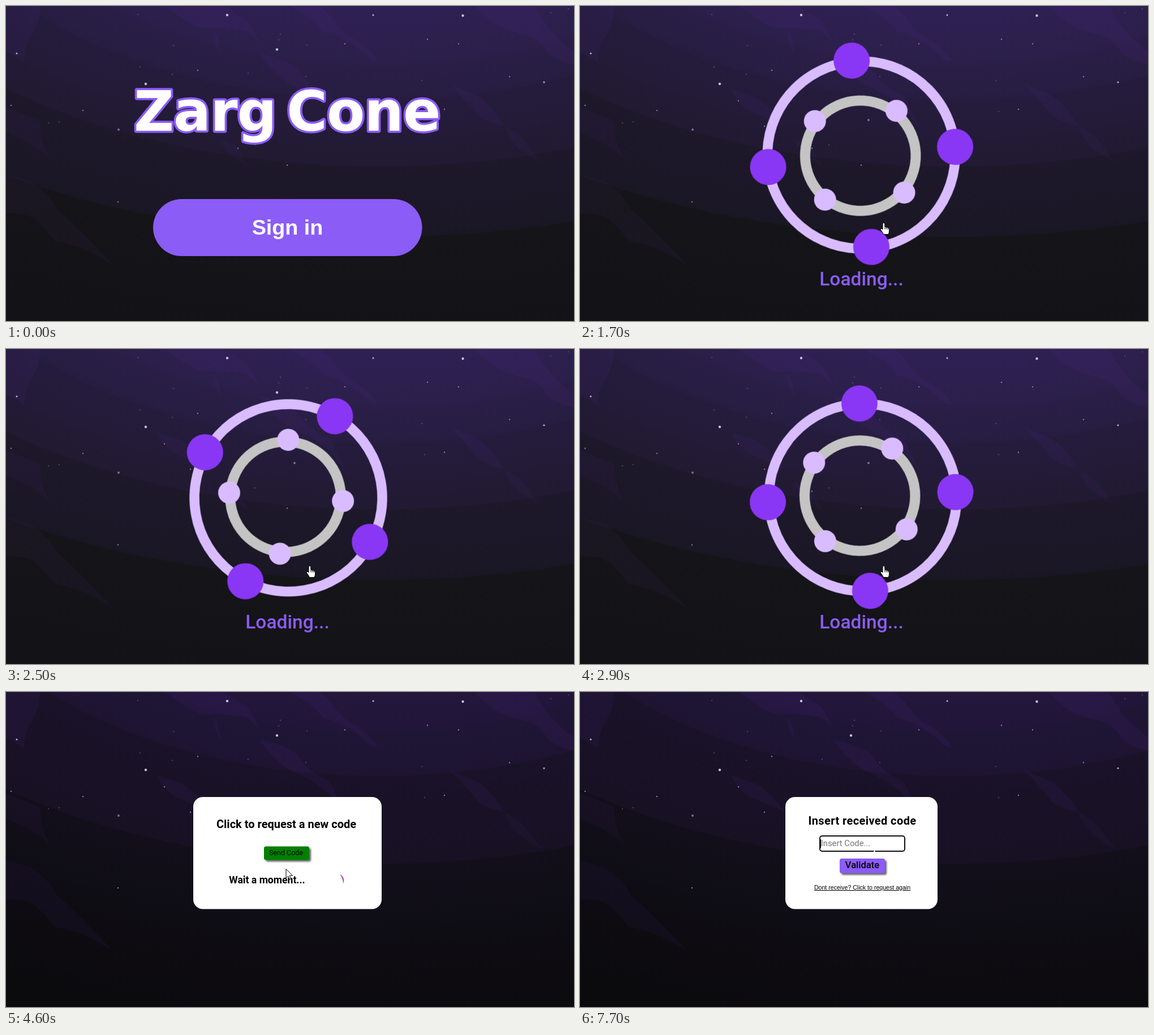
These frames come from a looping animation (1004 px wide and 558 px high, 8 s). An HTML page without scripts:

```html
<!DOCTYPE html>
<html lang="en">
<head>
<meta charset="utf-8">
<title>Sign-in flow</title>
<style>
html, body { margin: 0; height: 100%; overflow: hidden; background: #131217 }
svg { display: block; width: 100vw; height: 100vh }

/* one shared 8 s clock */
.t { animation: 8s step-end -10ms infinite }

.home { animation-name: home }
.load { animation-name: load }
.dim { animation-name: form }
.ask { animation-name: ask }
.wait { animation-name: wait }
.code { animation-name: code }
@keyframes home { 0% { visibility: visible } 21.25%, 100% { visibility: hidden } }
@keyframes load { 0% { visibility: hidden } 21.25% { visibility: visible } 43.75%, 100% { visibility: hidden } }
@keyframes form { 0% { visibility: hidden } 43.75%, 100% { visibility: visible } }
@keyframes ask { 0% { visibility: hidden } 43.75% { visibility: visible } 87.5%, 100% { visibility: hidden } }
@keyframes wait { 0% { visibility: hidden } 57.5% { visibility: visible } 87.5%, 100% { visibility: hidden } }
@keyframes code { 0% { visibility: hidden } 87.5%, 100% { visibility: visible } }

.sign { animation-name: sign }
@keyframes sign { 0% { fill: #8b5cf6 } 8.75%, 100% { fill: #7b1bea } }
.send { animation-name: send }
@keyframes send { 0% { fill: #008000 } 51.25% { fill: #006400 } 57.5%, 100% { fill: #008000 } }
.rise { animation-name: rise }
@keyframes rise { 0% { transform: translateY(24.5px) } 57.5%, 100% { transform: none } }

/* loader rings turn in opposite ways, --d gives the direction */
.ring { animation-name: ring }
@keyframes ring {
  0% { transform: rotate(calc(var(--d) * 23.8deg)) }
  22.5% { transform: rotate(calc(var(--d) * 23.8deg)); animation-timing-function: steps(11) }
  36.25% { transform: rotate(calc(var(--d) * -63.3deg)) }
  37.5% { transform: rotate(calc(var(--d) * -63.3deg)); animation-timing-function: steps(4) }
  42.5%, 100% { transform: rotate(calc(var(--d) * -95deg)) }
}
.spin { animation-name: spin }
@keyframes spin {
  0% { transform: rotate(-20deg) }
  58.75% { transform: rotate(-20deg); animation-timing-function: steps(10) }
  71.25% { transform: rotate(420deg) }
  72.5% { transform: rotate(420deg); animation-timing-function: steps(10) }
  85%, 100% { transform: rotate(860deg) }
}

.move { animation-name: move }
@keyframes move {
  0% { transform: translate(-60px, -60px) }
  1.25% { transform: translate(47px, 14px); animation-timing-function: steps(4) }
  6.25% { transform: translate(260px, 170px); animation-timing-function: steps(2) }
  8.75% { transform: translate(430px, 345px); animation-timing-function: steps(2) }
  11.25% { transform: translate(537px, 384px) }
  47.5% { transform: translate(537px, 384px); animation-timing-function: steps(3) }
  51.25% { transform: translate(495px, 313px) }
  58.75% { transform: translate(495px, 313px); animation-timing-function: steps(5) }
  65% { transform: translate(633px, 436px); animation-timing-function: steps(4) }
  70% { transform: translate(628px, 428px) }
  72.5% { transform: translate(628px, 428px); animation-timing-function: steps(9) }
  83.75% { transform: translate(592px, 380px) }
  85% { transform: translate(586px, 371px) }
  86.25% { transform: translate(586px, 371px); animation-timing-function: steps(8) }
  96.25%, 100% { transform: translate(520px, 282px) }
}
.hand { animation-name: hand }
.arrow { animation-name: arrow }
.beam { animation-name: beam }
@keyframes hand { 0% { visibility: hidden } 8.75% { visibility: visible } 48.75%, 100% { visibility: hidden } }
@keyframes arrow { 0% { visibility: visible } 8.75% { visibility: hidden } 48.75% { visibility: visible } 96.25%, 100% { visibility: hidden } }
@keyframes beam { 0% { visibility: hidden } 96.25%, 100% { visibility: visible } }

text { font-family: Roboto, "Noto Sans", sans-serif; text-anchor: middle }
.title { font: 700 98px "DejaVu Sans", sans-serif; text-anchor: start; letter-spacing: -1px;
  fill: #fff; stroke: #8b5cf6; stroke-width: 7.5px; stroke-linejoin: round; paint-order: stroke }
.label { font: 700 37.7px "Liberation Sans", Arial, sans-serif; fill: #fff }
.link { font: 10.6px "Liberation Sans", Arial, sans-serif; text-decoration: underline }
.head { font-size: 20px; font-weight: 700 }
.drop { filter: drop-shadow(3px 3px 1.5px #0009) }
.star { fill: none; stroke-linecap: round }
</style>
</head>
<body>
<svg viewBox="0 0 1004 558" preserveAspectRatio="none">
  <defs>
    <radialGradient id="sky" gradientUnits="userSpaceOnUse" cx="0" cy="0" r="900" gradientTransform="translate(660 -300) scale(1.75 1)">
      <stop offset=".33" stop-color="#2f2054"/>
      <stop offset=".45" stop-color="#2b1f4a"/>
      <stop offset=".452" stop-color="#2a1e47"/>
      <stop offset=".517" stop-color="#271d41"/>
      <stop offset=".519" stop-color="#251c3d"/>
      <stop offset=".648" stop-color="#211a32"/>
      <stop offset=".65" stop-color="#1d182a"/>
      <stop offset=".786" stop-color="#1a1725"/>
      <stop offset=".789" stop-color="#151419"/>
      <stop offset="1" stop-color="#131217"/>
    </radialGradient>
    <radialGradient id="night" href="#sky">
      <stop offset=".33" stop-color="#23173c"/>
      <stop offset=".413" stop-color="#211539"/>
      <stop offset=".415" stop-color="#1f1535"/>
      <stop offset=".497" stop-color="#1e1432"/>
      <stop offset=".5" stop-color="#1a1228"/>
      <stop offset=".67" stop-color="#181124"/>
      <stop offset=".673" stop-color="#120f1a"/>
      <stop offset=".78" stop-color="#0f0d15"/>
      <stop offset="1" stop-color="#0b0a0c"/>
    </radialGradient>
  </defs>

  <rect width="1004" height="558" fill="url(#sky)"/>
  <rect class="t dim" width="1004" height="558" fill="url(#night)"/>

  <!-- nebula wisps -->
  <g fill="#5a2fa0" fill-opacity=".1">
    <path d="M0 0H61Q60 30 42 58Q32 75 32 100Q16 88 0 82z"/>
    <path d="M282 0Q315 28 345 40Q390 38 425 44Q440 55 450 70Q440 45 425 25L385 0z"/>
    <path d="M365 44Q366 65 380 86Q378 68 373 52z"/>
    <path d="M500 0Q545 22 560 46Q605 55 645 96L657 98Q650 78 605 52Q580 30 575 18L555 0z"/>
    <path d="M448 84Q470 120 505 140Q550 160 575 185L602 218Q580 175 572 158Q535 145 515 110Q490 92 448 84z"/>
    <path d="M268 148Q280 180 310 190L362 212Q335 175 310 162z"/>
    <path d="M785 138Q815 170 835 195Q855 208 880 212Q865 182 835 160z"/>
    <path d="M828 0Q860 38 905 48Q945 55 955 82Q975 98 1004 104V80Q960 50 935 0z"/>
  </g>
  <g fill="#5a2fa0" fill-opacity=".07">
    <path d="M0 225Q45 240 78 270Q58 235 62 205Q30 190 0 180z"/>
    <path d="M0 298L42 310Q75 330 90 360Q125 390 192 461Q140 425 85 416Q60 380 40 372Q20 366 0 368z"/>
    <path d="M375 235Q395 268 430 287Q415 262 405 245z"/>
    <path d="M880 212Q895 255 946 277Q925 250 918 240Q905 225 880 212z"/>
  </g>

  <g class="star">
    <path stroke="#c9bfdc" stroke-width="4.4" d="M391 16h.01M807.500 17h.01M479 77h.01M247 138h.01"/>
    <path stroke="#b9aece" stroke-width="3.2" d="M649 16h.01M951 135h.01M19 84h.01"/>
    <path stroke="#7d728f" stroke-width="3.8" d="M199 219h.01M510 202h.01"/>
    <path stroke="#85799c" stroke-width="2.4" d="M599 67h.01M745 59h.01M800 67h.01M339 114h.01M280 168h.01M136 185h.01M9 176h.01M890 125h.01M775 183h.01M326 213h.01M198 347h.01M497 282h.01M410 252h.01"/>
    <path stroke="#625577" stroke-width="1.8" d="M485 50h.01M532 69h.01M963 12h.01M994 5h.01M237 108h.01M294 121h.01M530 125h.01M735 132h.01M740 187h.01M440 246h.01M428 119h.01M296 70h.01M233 15h.01M482 60h.01M75 207h.01M94 205h.01"/>
  </g>

  <g class="t home">
    <text class="title" y="221"><tspan x="226">Zarg</tspan><tspan x="496">Cone</tspan></text>
    <rect class="t sign" x="260" y="342" width="475.500" height="101" rx="50.500"/>
    <text class="label" x="497.500" y="405">Sign in</text>
  </g>

  <g class="t load">
    <g transform="translate(498 262)">
      <g class="t ring" style="--d:1" fill="#8a36f5">
        <circle cy="2" r="166" fill="none" stroke="#d9bcff" stroke-width="17.500"/>
        <circle cx="-83" cy="-144" r="32"/>
        <circle cx="146" cy="-78" r="32"/>
        <circle cx="82" cy="144" r="32"/>
        <circle cx="-142" cy="88" r="32"/>
      </g>
      <g class="t ring" style="--d:-1" fill="#d9bcff">
        <circle cx="-3.400" cy="2" r="97.800" fill="none" stroke="#c4c4c4" stroke-width="18"/>
        <circle cx="-52.300" cy="-86.500" r="19.500"/>
        <circle cx="87" cy="-45" r="19.500"/>
        <circle cx="41" cy="93" r="19.500"/>
        <circle cx="-92" cy="48" r="19.500"/>
      </g>
    </g>
    <text x="497.500" y="495" font-size="33.500" font-weight="500" fill="#8b5cf6">Loading...</text>
  </g>

  <g class="t ask">
    <rect x="331" y="186" width="333" height="198.500" rx="17" fill="#fff"/>
    <g class="t rise">
      <text class="head" x="495.500" y="241">Click to request a new code</text>
      <g class="drop"><rect class="t send" x="456" y="273.500" width="80" height="24" rx="3.500"/></g>
      <text x="495" y="289" font-size="12.500">Send Code</text>
    </g>
    <g class="t wait">
      <text x="461.500" y="339" font-size="17.600" font-weight="700">Wait a moment...</text>
      <g transform="translate(585 334)">
        <path class="t spin" fill="#800080" d="M8.500-8.500A12 12 0 0 1 8.500 8.500A20 20 0 0 0 8.500-8.500z"/>
      </g>
    </g>
  </g>

  <g class="t code">
    <rect x="363" y="186" width="269" height="198.500" rx="17" fill="#fff"/>
    <text class="head" x="499" y="235" letter-spacing=".4">Insert received code</text>
    <rect x="424" y="255" width="150" height="27" rx="4" fill="#fff" stroke="#101010" stroke-width="2"/>
    <text x="469.500" y="273" font-size="14.800" fill="#757575">Insert Code...</text>
    <path d="M425.500 261v15" stroke="#000"/>
    <rect class="drop" x="459" y="295" width="80" height="26" rx="3.500" fill="#8b5cf6"/>
    <text x="499" y="312" font-size="16.500" font-weight="500">Validate</text>
    <text class="link" x="499" y="350">Dont receive? Click to request again</text>
  </g>

  <g class="t move" fill="#fff" stroke="#000" stroke-linejoin="round">
    <path class="t arrow" d="M0 .5V16.500L3.800 13L6.500 19.300L9 18.300L6.300 12.200H11.500z"/>
    <g class="t hand">
      <path d="M-2 12V2A1.900 1.900 0 0 1 1.800 2V7L7.500 8.500Q9.500 9 9.500 11.500V15Q9.500 17.500 8 20.500H-.5Q-2 17-5.500 12.500Q-6 9.500-3.500 10.500z"/>
      <path fill="none" d="M2 7v4.500M4.700 8v3.500M7.300 9v3"/>
    </g>
    <path class="t beam" stroke="none" d="M-.5-1.500h2v2.800h-2z"/>
  </g>
</svg>
</body>
</html>
```
